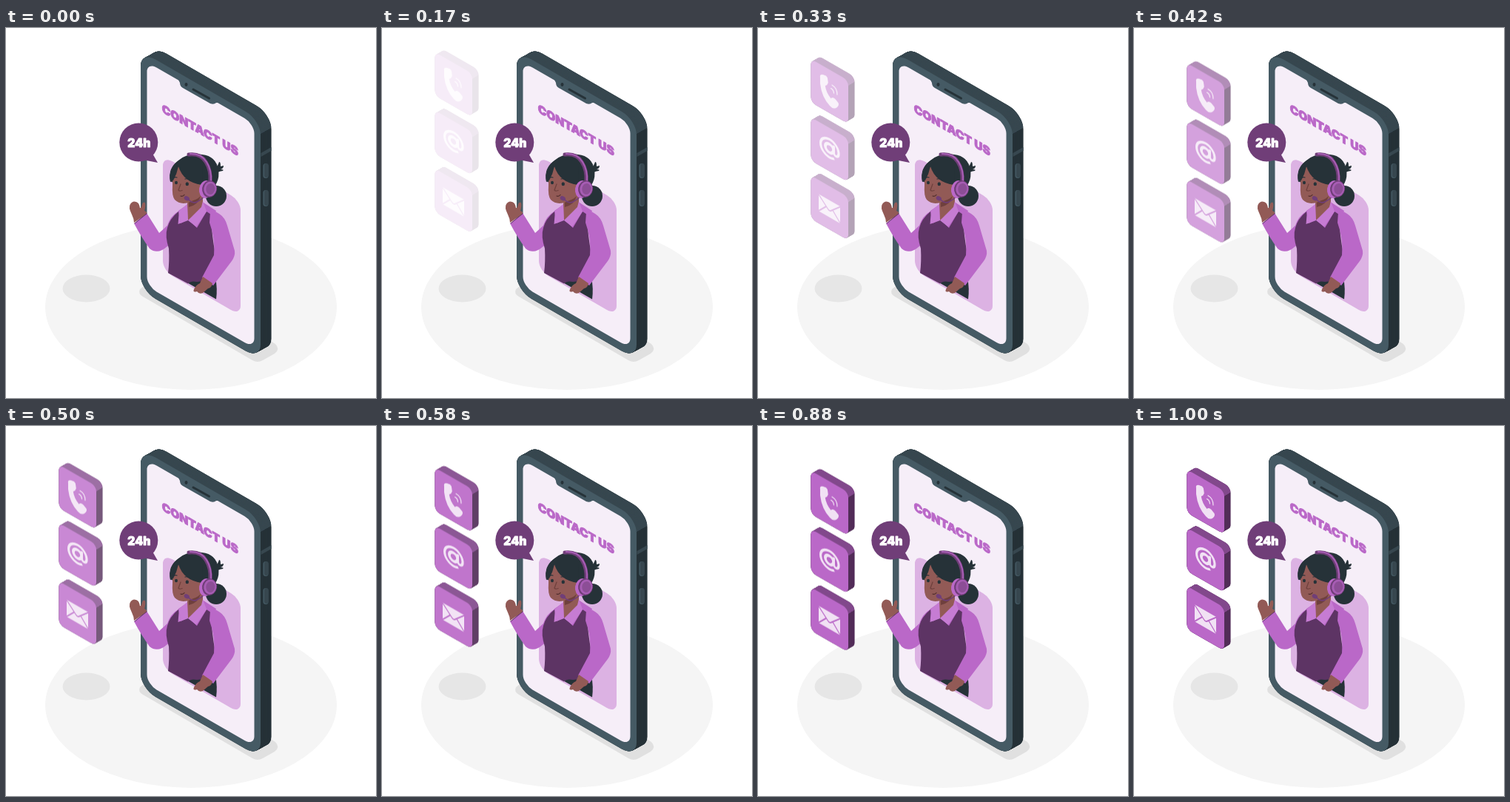
An HTML page with a canvas for the animation above (1040 ms loop, 500 by 500 pixels).

```html
<!DOCTYPE html>
<html lang="en">
<head>
<meta charset="utf-8">
<title>Contact us</title>
<style>
html, body { margin: 0; width: 100%; height: 100%; overflow: hidden; background: #fff; }
canvas { display: block; width: 500px; height: 500px; }
</style>
</head>
<body>
<canvas id="stage"></canvas>
<script>
const SIZE = 500, LOOP = 1040, FPS = 24, SLOPE = 0.577;
const LILAC = '#ba68c8', PLUM = '#703e78', MID = '#82498c', DEEP = '#5d3464', SHADE = '#532e59';
const INK = '#263238', SLATE = '#37474f', STEEL = '#455a64';
const SKIN = '#925a56', SKIN_DARK = '#6f403d', PALE = '#f1e1f4';
const FONT = 'Inter, "Open Sans", sans-serif';
const dpr = window.devicePixelRatio || 1;

function setup(canvas) {
  canvas.width = canvas.height = SIZE * dpr;
  const c = canvas.getContext('2d');
  c.scale(dpr, dpr);
  c.lineCap = c.lineJoin = 'round';
  return c;
}
const layer = () => setup(document.createElement('canvas'));

function fill(c, d, color) {
  c.fillStyle = color;
  c.fill(new Path2D(d));
}
function line(c, d, color, width) {
  c.strokeStyle = color;
  c.lineWidth = width;
  c.stroke(new Path2D(d));
}
function oval(c, x, y, rx, ry, color, turn = 0) {
  c.fillStyle = color;
  c.beginPath();
  c.ellipse(x, y, rx, ry, turn, 0, Math.PI * 2);
  c.fill();
}
function heavyText(c, text, x, y, size, color) {
  c.font = `900 ${size}px ${FONT}`;
  c.fillStyle = c.strokeStyle = color;
  c.lineWidth = 0.9;
  c.fillText(text, x, y);
  c.strokeText(text, x, y);
}

// Runs draw() on the vertical plane that recedes to the right.
function onPlane(c, draw) {
  c.save();
  c.transform(1, SLOPE, 0, 1, 0, 0);
  draw();
  c.restore();
}
function panel(c, b, color) {
  onPlane(c, () => {
    c.fillStyle = color;
    c.beginPath();
    c.roundRect(b.x, b.y, b.w, b.h, b.r);
    c.fill();
  });
}
function extrude(c, b, dx, dy, color) {
  const n = Math.ceil(dx * 3);
  for (let i = n; i >= 0; i--) {
    c.save();
    c.translate(dx * i / n, dy * i / n);
    panel(c, b, color);
    c.restore();
  }
}
function slab(c, b, dx, dy, front, top, side) {
  extrude(c, b, dx, dy, side);
  const px = b.x + b.w, py = px * SLOPE + b.y + b.r * 0.9;
  c.save();
  c.clip(new Path2D(`M${px} ${py}L${px + dx * 9} ${py + dy * 9}L-50 -300L-50 600Z`));
  extrude(c, b, dx, dy, top);
  c.restore();
  panel(c, b, front);
}

function drawPhone(c) {
  oval(c, 250, 377, 197, 112, '#f5f5f5');
  oval(c, 108.5, 352, 32, 18.5, '#e6e6e6');
  fill(c, 'M181 353Q178 359 185 363L333 449Q340 453 347 449L363 440Q371 434 364 427L340 412L190 346Z', '#e0e0e0');

  slab(c, { x: 182, y: -74, w: 162, h: 323.5, r: 20 }, 14.5, -8, STEEL, SLATE, INK);
  fill(c, 'M344.5 174L358.5 166V161L344.5 169Z', SLATE);
  for (const [y, h] of [[183, 20], [219, 22]]) {
    c.fillStyle = STEEL;
    c.beginPath();
    c.roundRect(347.5, y, 7, h, 3.5);
    c.fill();
    c.fillStyle = SLATE;
    c.beginPath();
    c.roundRect(349, y, 5.5, h - 1, 3);
    c.fill();
  }
  panel(c, { x: 190.5, y: -64, w: 145, h: 303, r: 13 }, '#f6eef8');
  fill(c, 'M232 68L235 74Q235 79 239 81L276 102Q281 104 284 101L288 101L260 83Z', STEEL);
  oval(c, 243.5, 76.5, 2, 2.4, INK);
  line(c, 'M253 83L274.5 95', INK, 3);

  onPlane(c, () => heavyText(c, 'CONTACT US', 210.7, -7.8, 15.5, LILAC));
  panel(c, { x: 212, y: 50.5, w: 105, h: 155, r: 13 }, '#dcb2e3');
}

function drawBody(c) {
  // trousers
  fill(c, 'M222 331L283 338Q286 352 284 366.5Z', INK);
  // raised arm
  fill(c, 'M234 247Q222 254 218 267L207 277L190 250L173 264Q183 283 194 298Q205 307 218 295L226 290Z', LILAC);
  fill(c, 'M173 263Q173 258 170 252Q165 242 168 238Q171 233 176 235Q180 236 181 243Q183 244 184 238Q186 234 188 236.5Q189 240 187 247Q192 249 189 252Z', SKIN);
  line(c, 'M174 264L190 251', DEEP, 1);
  // shirt and vest
  fill(c, 'M233 247L246 238L267 236L284 247Q278 262 275 280L225 285Z', LILAC);
  fill(c, 'M233 248Q221 258 218 270Q214.5 281 220 298Q221 316 219 331L246 345.5Q250 341 258 343L276 341Q283 322 283 305Q278 282 277 252L271 248L258 270L246 259L236 264Z', DEEP);
  // neck and collar
  fill(c, 'M246 226L266 221L266 240Q258 252 245.5 260L245 238Z', SKIN);
  fill(c, 'M247 234Q258 233 263 227Q260 239 247 242Z', SKIN_DARK);
  fill(c, 'M245 238L234 247L232.5 265L246 260Z', '#c67cd3');
  fill(c, 'M266 234L264 242L246 260L257 268.5L271 248Z', '#c67cd3');
  // arm on the hip
  fill(c, 'M276 249Q282 246 288 251Q296 256 299 267L309 301Q310 308 305 315L280 348L265 337L281 307Q283 285 275 263Z', LILAC);
  fill(c, 'M266 336L279 345Q278 351 273 352L266 358Q261 360 258 356Q252 358 254 353Q257 347 262 345Z', SKIN);
}

function drawHead(c) {
  oval(c, 284, 227, 14, 14, INK);
  fill(c, 'M280 194Q286 187 288 181Q290 180 290 187L294 186Q294 190 290 191Q295 191 293 193Q285 194 282 199Z', INK);
  fill(c, 'M222 207Q219 190 233 179Q246 168 265 171Q284 173 287 192Q290 210 273 222L245 218Z', INK);
  fill(c, 'M225 199Q230 188 234 187Q245 202 256 208L266 213Q263 229 249 235Q236 240 228 232Q224 227 225 213Z', SKIN);
  fill(c, 'M233 187Q231 197 226 206L222 208Q218 188 235 178Q252 170 266 188L265 212Q240 209 233 187Z', INK);
  // face
  oval(c, 230, 209, 2, 2.3, INK);
  oval(c, 244.8, 210.7, 2.2, 2.5, INK);
  line(c, 'M226 203Q228 201 231 202M242 204Q246 203 249 206', INK, 1.2);
  line(c, 'M236 211L233 219Q234 221 238 219.5', SKIN_DARK, 1.3);
  line(c, 'M236 227Q239 228 241 225.5', '#4b292a', 1.2);
  // headset
  line(c, 'M247 171Q263 169 270 181Q277 192 276 207', PLUM, 5);
  line(c, 'M249 170Q264 169.5 271 181Q278 192 277 207', '#a75db4', 2.2);
  line(c, 'M246 231Q252 238 258 235Q264 232 270 226', PLUM, 1.6);
  oval(c, 244.3, 230.3, 3.8, 2.8, PLUM, 0.5);
  oval(c, 270, 218, 9, 12, LILAC, 0.15);
  oval(c, 275, 217.5, 10, 11.5, PLUM, 0.15);
  oval(c, 275.8, 217.5, 8.5, 10, '#a75db4', 0.15);
  oval(c, 276.3, 217.5, 6, 7.5, '#8c4e96', 0.15);
}

function drawBubble(c) {
  fill(c, 'M185 178L205 182L197 168Z', PLUM);
  oval(c, 179.3, 154.5, 26, 26, PLUM);
  c.textAlign = 'center';
  heavyText(c, '24h', 179.8, 161, 15.6, '#fff');
}

function drawTiles(c) {
  for (let i = 0; i < 3; i++)
    slab(c, { x: 71.5, y: 17.5 + i * 78.7, w: 50.5, h: 58.5, r: 7 }, 8.5, -5, LILAC, MID, SHADE);

  fill(c, 'M84 84Q83 79 88 80L92 81.5Q94 83 94.3 87L94.8 91Q94 94 90.8 95Q92 104 98.5 112Q101 109.5 104.5 113L108.5 118Q110 121 107 124Q102 128 97 122Q86 110 84 92Z', PALE);
  line(c, 'M98.5 98.5Q102 100 102.5 105M100 94Q107 98 107 107', PALE, 1.2);

  onPlane(c, () => {
    c.save();
    c.translate(96.8, 123.8);
    c.strokeStyle = PALE;
    c.lineCap = 'butt';
    c.lineWidth = 3.8;
    c.beginPath();
    c.arc(-0.3, 0, 5.6, 0, Math.PI * 2);
    c.stroke();
    c.lineWidth = 3.2;
    c.beginPath();
    c.moveTo(5.6, -7);
    c.lineTo(5.6, 2);
    c.bezierCurveTo(5.6, 7.5, 12.2, 7, 12.2, 0);
    c.arc(0, 0, 12.2, 0, Math.PI * 0.33, true);
    c.stroke();
    c.restore();

    c.fillStyle = PALE;
    c.fillRect(82, 194, 29, 23);
    line(c, 'M82 194.5L94.5 207Q96.5 209 98.5 207L111 194.5M82 216.5L92 205M111 216.5L101 205', LILAC, 1.5);
  });
}

const bez = (s, a, b) => 3 * (1 - s) ** 2 * s * a + 3 * (1 - s) * s * s * b + s ** 3;

// cubic-bezier(.36, -.01, .5, 1.38)
function ease(x) {
  let lo = 0, hi = 1;
  for (let i = 0; i < 24; i++) {
    const m = (lo + hi) / 2;
    if (bez(m, 0.36, 0.5) < x) lo = m; else hi = m;
  }
  return bez(hi, -0.01, 1.38);
}

// Steps at 24 per second, held on 10 ms ticks.
function stepAt(ms) {
  let k = 0;
  while (k < FPS && Math.round((k + 1) * 100 / FPS) * 10 <= ms) k++;
  return k;
}

const stage = setup(document.getElementById('stage'));
const scene = layer(), tiles = layer();

scene.fillStyle = '#fff';
scene.fillRect(0, 0, SIZE, SIZE);
drawPhone(scene);
drawBody(scene);
drawHead(scene);
drawBubble(scene);
drawTiles(tiles);

function render(ms) {
  stage.globalAlpha = 1;
  stage.drawImage(scene.canvas, 0, 0, SIZE, SIZE);
  const k = stepAt(ms);
  if (k < 3) return;
  const p = ease(Math.min(1, (k + 0.5) / FPS));
  stage.globalAlpha = Math.max(0, Math.min(1, p));
  stage.drawImage(tiles.canvas, 0, 30 * (p - 1), SIZE, SIZE);
}

function tick() {
  render(performance.now() % LOOP);
  requestAnimationFrame(tick);
}
tick();
</script>
</body>
</html>
```
